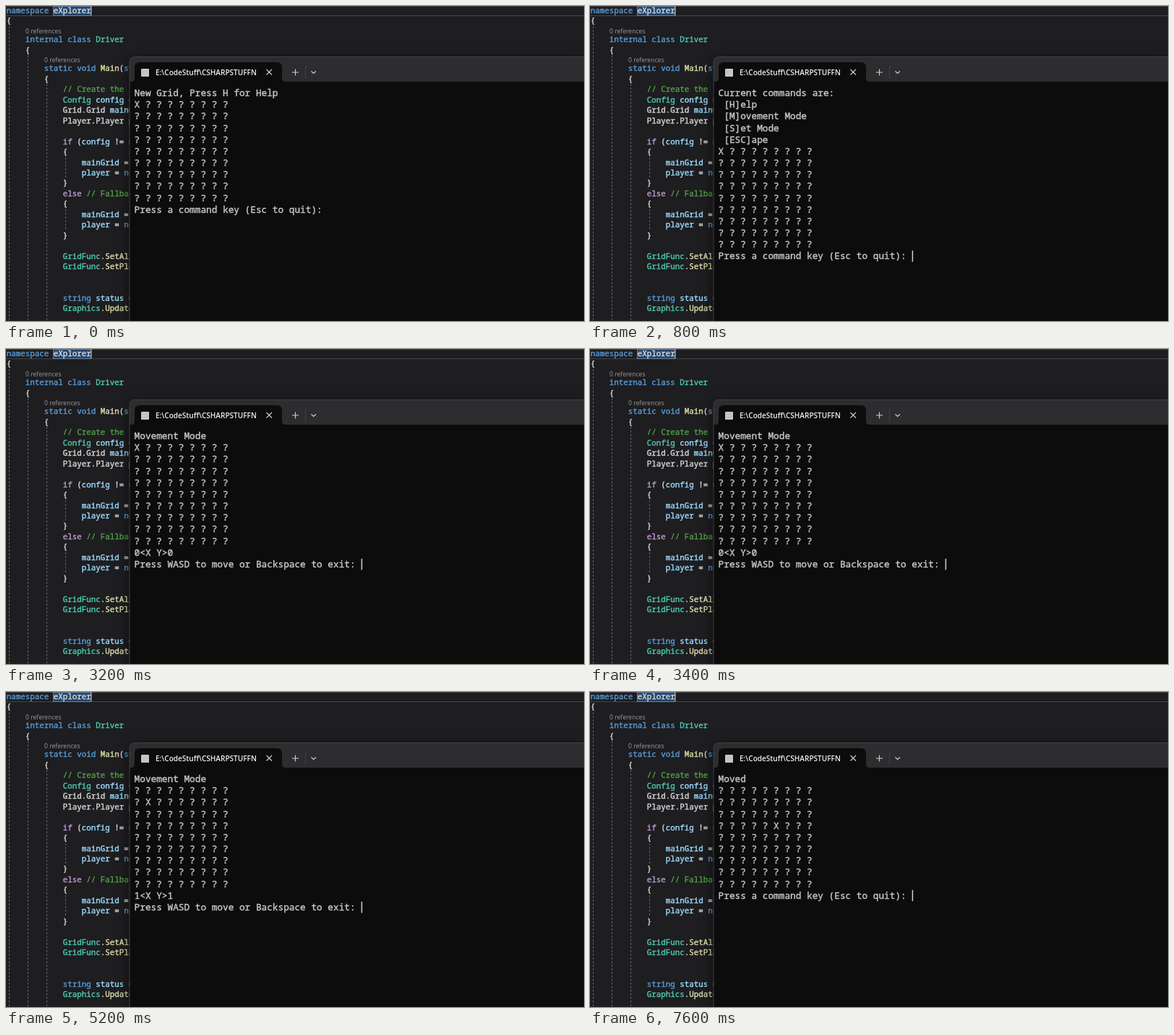
An HTML page for the animation above (8000 ms loop, 800x437 px).

```html
<!DOCTYPE html>
<html lang="en">
<head>
<meta charset="utf-8">
<title>Grid game in a terminal</title>
<style>
html, body { margin: 0; height: 100%; overflow: hidden; background: #1e1d20; }
svg { display: block; width: 100vw; height: 100vh; }
text { white-space: pre; }
.mono { font-family: "Noto Sans Mono", "DejaVu Sans Mono", monospace; }
.mono text, .mono tspan { fill: currentColor; stroke: currentColor; stroke-width: 0.4; }
.ui { font-family: "Open Sans", "Noto Sans", sans-serif; }
#code { font-size: 10.83px; }
#term { font-size: 12.76px; color: #c8c8c8; }
.guide { stroke: #626262; stroke-dasharray: 3 2; }
.icon { fill: none; stroke: #d0d0d0; stroke-width: 1.1; }
.shadow { filter: drop-shadow(0 5px 9px rgba(0, 0, 0, .65)); }
.k { color: #569cd6 } .t { color: #4ec9b0 } .m { color: #dcdcaa } .c { color: #4fa045 }
.v { color: #9cdcfe } .f { color: #bf9ad2 } .p { color: #d8d8d8 }
</style>
</head>
<body>
<svg viewBox="0 0 800 437" preserveAspectRatio="none">
  <rect width="800" height="437" fill="#1e1d20"/>
  <rect x="-1" y="0.5" width="802" height="13" fill="none" stroke="#454547"/>
  <rect x="65.5" y="0.5" width="52" height="13" fill="#24466e" stroke="#6b8198"/>
  <path d="M118 0V13" stroke="#bbb"/>
  <path class="guide" d="M4.5 28V437M30.5 68V437M56.5 108V437M82.5 210V239M82.5 282V311"/>
  <g id="code" class="mono"></g>
  <g class="ui" font-size="8.6" fill="#9a9a9a">
    <text x="27" y="38">0 references</text>
    <text x="53" y="78">0 references</text>
  </g>

  <path class="shadow" d="M171 437V78Q171 70.5 178.5 70.5H800V437Z" fill="#2d2d30"/>
  <path d="M171 437V105H173Q178 105 178 100V85Q178 78 185 78H375Q382 78 382 85V100Q382 105 387 105H800V437Z" fill="#0c0c0c"/>
  <path d="M171 437V78Q171 70.5 178.5 70.5H800" fill="none" stroke="#414143"/>
  <rect x="187" y="87" width="11" height="11" rx="1" fill="#c4c4c4"/>
  <text class="ui" x="207" y="96" font-size="10.05" font-weight="600" fill="#f0f0f0">E:\CodeStuff\CSHARPSTUFFN</text>
  <path class="icon" d="M360.5 88L368 95.5M368 88L360.5 95.5M396 92H405M400.5 87.5V96.5M422.5 90.5L425.7 93.5L429 90.5"/>
  <path d="M414.5 83V101" stroke="#434346"/>
  <g id="term" class="mono"></g>
  <rect id="cursor" width="1.5" height="15.5" fill="#d0d0d0"/>
</svg>
<script>
const $ = id => document.getElementById(id);
const esc = s => s.replace(/&/g, '&amp;').replace(/</g, '&lt;');

// Code rows: [centre y, indent, "class:text|class:text"]
const rows = [
  [6, 0, 'k:namespace |p:eXplorer'],
  [20.5, 0, 'p:{'],
  [46.5, 1, 'k:internal class |t:Driver'],
  [61, 1, 'p:{'],
  [86.5, 2, 'k:static void |m:Main|p:(|k:string'],
  [101, 2, 'p:{'],
  [115.5, 3, 'c:// Create the'],
  [130, 3, 't:Config |v:config |p:='],
  [144.5, 3, 'p:Grid.Grid |v:mainGrid'],
  [159, 3, 'p:Player.Player |v:player'],
  [188, 3, 'f:if |p:(|v:config |p:!= |k:null'],
  [202, 3, 'p:{'],
  [217, 4, 'v:mainGrid |p:= |k:new'],
  [231.5, 4, 'v:player |p:= |k:new'],
  [245.5, 3, 'p:}'],
  [260, 3, 'f:else |c:// Fallback'],
  [274.5, 3, 'p:{'],
  [289, 4, 'v:mainGrid |p:= |k:new'],
  [303.5, 4, 'v:player |p:= |k:new'],
  [318, 3, 'p:}'],
  [347, 3, 't:GridFunc|p:.|m:SetAll'],
  [361.5, 3, 't:GridFunc|p:.|m:SetPlayer'],
  [405, 3, 'k:string |v:status |p:='],
  [419.5, 3, 't:Graphics|p:.|m:Update']
];
$('code').innerHTML = rows.map(([y, indent, parts]) =>
  `<text x="${0.7 + indent * 26}" y="${y + 3.9}">` +
  parts.split('|').map(s => `<tspan class="${s[0]}">${esc(s.slice(2))}</tspan>`).join('') +
  '</text>').join('');

const LOOP = 8000, TICK = 200, BLINK = 530;
const LEFT = 177.6, PITCH = 7.66, TOP = 125, LINE = 16.17;
const HELP = ['Current commands are:', ' [H]elp', ' [M]ovement Mode', ' [S]et Mode', ' [ESC]ape'];
const COMMAND = 'Press a command key (Esc to quit): ';
const MOVE = 'Press WASD to move or Backspace to exit: ';

// Key presses; each one also restarts the cursor's blink
const START = -800, HELP_KEY = 740, MOVE_KEY = 3140, EXIT_KEY = 7500;
const path = 'RDRRDRRD';
const steps = [4390, 4790, 5310, 5510, 5710, 5910, 6110, 6310];
steps[1] = 5110;
const keys = [START, HELP_KEY, MOVE_KEY, ...steps, EXIT_KEY];

function screen(t) {
  const walked = path.slice(0, steps.filter(s => t >= s).length);
  const x = walked.split('R').length - 1, y = walked.split('D').length - 1;
  const grid = Array.from({ length: 9 }, (_, r) =>
    Array.from({ length: 9 }, (_, c) => r === y && c === x ? 'X' : '?').join(' '));
  if (t < HELP_KEY) return ['New Grid, Press H for Help', ...grid, COMMAND];
  if (t < MOVE_KEY) return [...HELP, ...grid, COMMAND];
  if (t < EXIT_KEY) return ['Movement Mode', ...grid, `${x}<X Y>${y}`, MOVE];
  return ['Moved', ...grid, COMMAND];
}

let shown = '';
function draw() {
  const t = Math.floor(performance.now() % LOOP / TICK) * TICK;
  const lines = screen(t), last = lines.length - 1;
  const html = lines.map((s, i) => `<text x="${LEFT}" y="${TOP + i * LINE}">${esc(s)}</text>`).join('');
  if (html !== shown) $('term').innerHTML = shown = html;
  const idle = t - Math.max(...keys.filter(k => k <= t));
  const cursor = $('cursor');
  cursor.setAttribute('x', LEFT + lines[last].length * PITCH);
  cursor.setAttribute('y', TOP + last * LINE - 12);
  cursor.setAttribute('opacity', idle % (2 * BLINK) < BLINK ? 1 : 0);
  requestAnimationFrame(draw);
}
draw();
</script>
</body>
</html>
```
